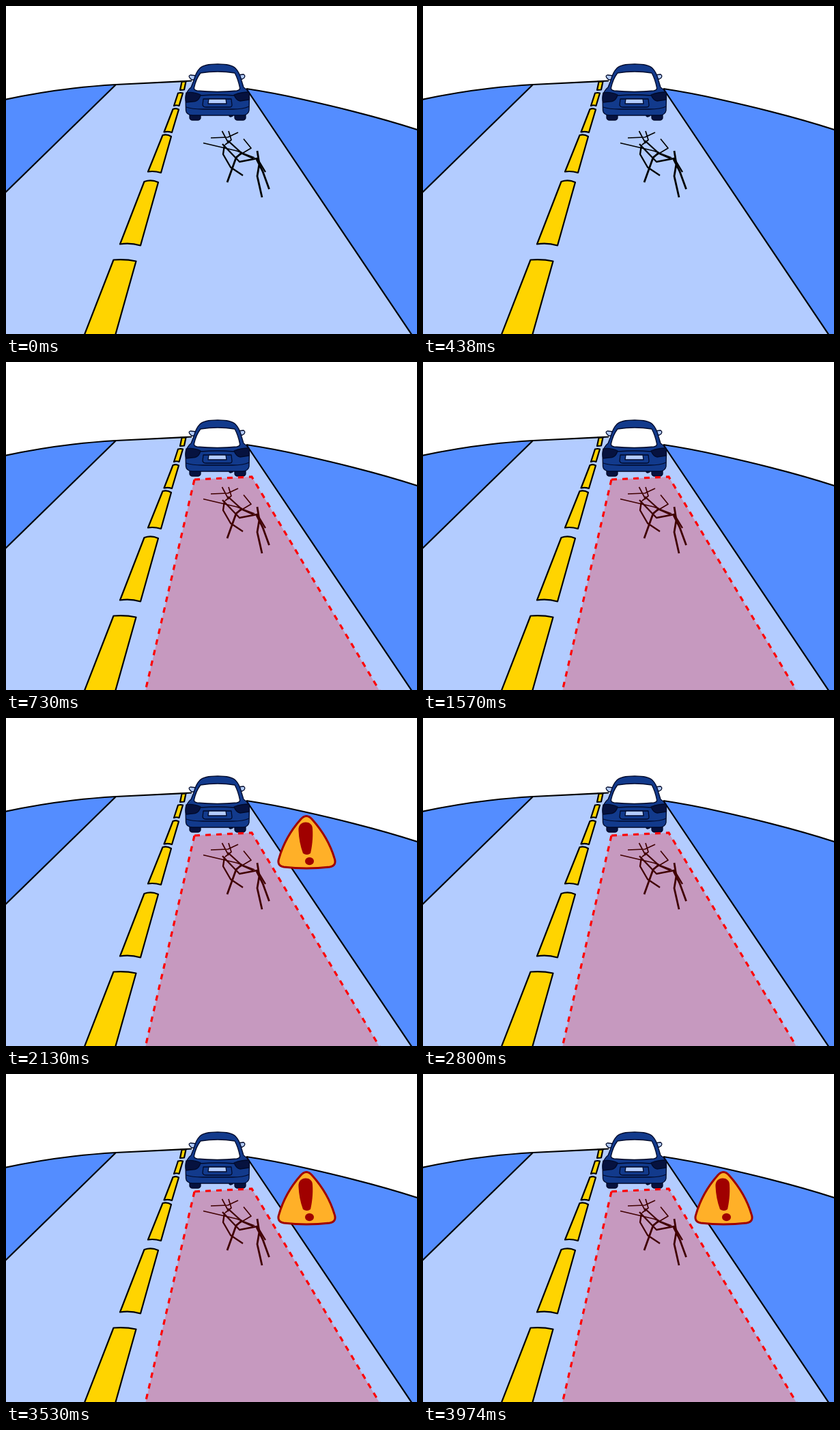
An HTML page that plays this animation: 602 px wide and 480 px high, repeating every 4.27 s.

```html
<!DOCTYPE html>
<html lang="en">
<head>
<meta charset="utf-8">
<title>Road hazard warning</title>
<style>
html, body { margin: 0; width: 100%; height: 100%; overflow: hidden; background: #fff; }
svg { display: block; width: 100%; height: 100%; }
.line { stroke: #000; stroke-width: 2.2; stroke-linejoin: round; }
#zone, #sign { opacity: 0; }
</style>
</head>
<body>
<svg viewBox="0 0 602 480" preserveAspectRatio="none">
  <g class="line">
    <path fill="#b3ccff" stroke="none" d="M0 272L161 115L265 109.500L353 121L594 480H0Z"/>
    <path fill="#548dff" stroke="none" d="M0 136.500Q50 126 98 120.500L161 115L0 272Z"/>
    <path fill="#548dff" stroke="none" d="M352 121Q395 127.500 436 137Q535 159 602 181V480H594Z"/>
    <path fill="none" d="M-2 137Q50 126 98 120.500Q128 117 161 115L272 109.500M161 115L-2 274M352 121Q395 127.500 436 137Q535 159 604 181.500M352 121L595 482"/>
  </g>

  <g class="line" fill="#ffd400">
    <path d="M257.500 111L263.500 110.500L261 122.500L255 123Z"/>
    <path d="M252 127.500Q256 126.500 259 127.500L253.500 146Q250 144.500 246 146Z"/>
    <path d="M244.500 151Q249 149 253 151.500L243 185Q237 183 231.500 184.500Z"/>
    <path d="M229.500 189Q236 187 242 191L227 244Q217 241 208 242.500Z"/>
    <path d="M202.500 257Q213 253.500 223 258L197 350.500Q182 346 167 348.500Z"/>
    <path d="M157.500 371.500Q175 370 190.500 373.500L160 482H114.500Z"/>
  </g>

  <g id="car" stroke="#000a2b" stroke-width="1.300" stroke-linejoin="round">
    <path fill="#06123f" d="M269 156H285V164Q284 167 281 167H273Q270 167 269 164ZM335 156H351V164Q350 167 347 167H339Q336 167 335 164ZM327 158H332V161Q329 163 327 161Z"/>
    <path fill="#b3ccff" d="M279 102L270 101Q267 102 269 105L272 108H278ZM340 101L348 100Q351 102 349 105L346 107H341Z"/>
    <path fill="#123a8c" d="M284 91Q290 85 310 85Q330 85 336 91Q342 97 345 109L348 119Q355 123 356.500 132L356 153Q355 159 347 160H273Q264 159 263.500 153L263 135Q264 124 271 119L275 109Q278 97 284 91Z"/>
    <path fill="#fff" d="M285 98Q310 94 335 98Q340 107 342.500 120Q343 123 338 124Q310 127 280 124Q275 123 275.500 120Q278 107 285 98Z"/>
    <path fill="#06123f" d="M264 127Q274 125 285 130Q283 138 277 139.500L264 141Q262 135 264 127ZM356 126Q344 126 334 130Q337 138 343 139L356.500 137Z"/>
    <path fill="none" d="M285 131Q310 129 334 131M289 136L288 145Q289 148 293 148H327Q331 148 331 145L330 136ZM264 148Q272 151 288 151H332Q348 151 356 147"/>
    <path fill="#b3ccff" d="M297 136H322L323 143H296Z"/>
  </g>

  <g fill="none" stroke="#000" stroke-linejoin="round">
    <path stroke-width="1.700" d="M300 193L325 192L340 185M316.500 183L326 201M326 183L330 196L321 203M348 194.500L359 208L337 221M289 200.500L338 212L364 222"/>
    <path stroke-width="2.300" d="M317 202L342 228L368 223L380 243M320 203L318 217L329 236L347 248M325 197L346 216L362 223"/>
    <path stroke-width="2.800" d="M346 214L337 222L324 258M368 212L371 231L368 249L375 280M367 224L376 242L385.500 268"/>
  </g>

  <g id="zone">
    <path fill="#f00" fill-opacity=".25" d="M276 172L360 168L546.500 480H204.500Z"/>
    <g fill="none" stroke="#f00" stroke-width="3.200" stroke-dasharray="8 8">
      <path d="M276 172L360 168L549.500 485"/>
      <path d="M276 172L203.500 484"/>
    </g>
  </g>

  <g id="sign">
    <path fill="#ffb028" stroke="#a00000" stroke-width="3" stroke-linejoin="round" d="M431 149Q440 138 449 149Q472 175 481 205Q485 216 474 218Q440 222 407 218Q396 216 400 205Q409 174 431 149Z"/>
    <g fill="#a00000">
      <path d="M428.500 165C427 149 449 149 449 162C450 176 448 190 446 198Q441 202 435 198C431 187 429 176 428.500 165Z"/>
      <ellipse cx="444.500" cy="209.500" rx="6.500" ry="5.700"/>
    </g>
  </g>
</svg>
<script>
const LOOP = 4270;
const steps = {
  zone: [[0, 0], [730, 1]],
  sign: [[0, 0], [2130, 1], [2800, 0], [3530, 1]]
};

for (const [id, list] of Object.entries(steps)) {
  const frames = list.map(([ms, opacity]) => ({ offset: ms / LOOP, opacity, easing: "steps(1, end)" }));
  frames.push({ offset: 1, opacity: list.at(-1)[1] });
  const anim = document.getElementById(id).animate(frames, { duration: LOOP, iterations: Infinity });
  anim.startTime = 0;
}
</script>
</body>
</html>
```
